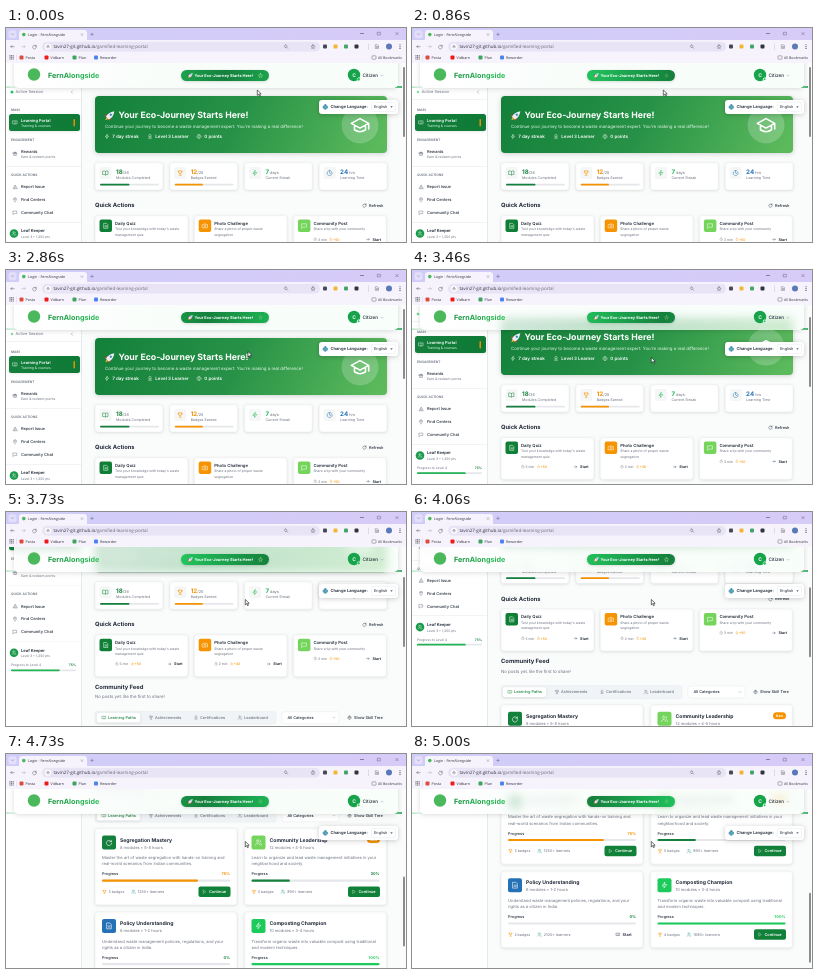
An HTML page with a canvas that plays this animation: 400 by 214 pixels, repeating every 5070 ms.

```html
<!DOCTYPE html>
<html lang="en">
<head>
<meta charset="utf-8">
<title>Learning portal</title>
<style>
html, body { margin: 0; width: 100%; height: 100%; overflow: hidden; background: #fff; }
canvas { display: block; width: 400px; height: 214px; }
</style>
</head>
<body>
<canvas id="stage"></canvas>
<script>
const W = 400, H = 214, TOP = 35, LOOP = 5070, STEP = LOOP / 76;
const canvas = document.getElementById('stage');
const dpr = window.devicePixelRatio || 1;
canvas.width = W * dpr;
canvas.height = H * dpr;
const c = canvas.getContext('2d');

const UI = 'Inter, sans-serif', CHROME = '"Open Sans", sans-serif';
const INK = '#1f2937', GRAY = '#6b7280', GREEN = '#15803d', ORANGE = '#f59300', LIME = '#74d45c';

// Icons on a 24-unit grid
const ICONS = {
  book: 'M12 6v14M2 4h7l3 2 3-2h7v14h-7l-3 2-3-2H2z',
  trophy: 'M7 3h10v7a5 5 0 0 1-10 0zM7 5H3v2l4 4M17 5h4v2l-4 4M12 15v5M8 21h8',
  bolt: 'M13 2L4 14h7l-1 8 10-12h-8z',
  clock: 'M12 2a10 10 0 1 0 .1 0M12 6v6l4 2',
  star: 'M12 2l3 7 7 1-5 5 1 7-6-4-6 4 1-7-5-5 7-1z',
  warn: 'M12 3L2 21h20zM12 10v5M12 17v1',
  pin: 'M12 22S4 15 4 9a8 8 0 0 1 16 0c0 6-8 13-8 13M12 7a2 2 0 1 0 .1 0',
  chat: 'M3 4h18v13H9l-6 4z',
  users: 'M9 3a4 4 0 1 0 .1 0M2 21c0-9 14-9 14 0M17 4a4 4 0 0 1 0 7M19 14q3 2 3 7',
  play: 'M6 3l14 9-14 9z',
  arrow: 'M4 12h16M14 6l6 6-6 6',
  down: 'M5 9l7 7 7-7',
  left: 'M15 5l-7 7 7 7',
  back: 'M20 12H4M10 6l-6 6 6 6',
  cap: 'M12 4L1 10l11 6 11-6zM5 12v6q7 5 14 0v-6M23 10v7',
  gift: 'M3 8h18v4H3zM5 12v9h14v-9M12 8v13M12 8C4 8 7 0 12 8c5-8 8 0 0 0',
  camera: 'M2 7h5l2-3h6l2 3h5v13H2zM12 9a4 4 0 1 0 .1 0',
  reload: 'M20 5v5h-5M20 10a9 9 0 1 0 1 5',
  globe: 'M12 2a10 10 0 1 0 .1 0M2 12h20M12 2q-9 10 0 20q9-10 0-20',
  target: 'M12 2a10 10 0 1 0 .1 0M12 7a5 5 0 1 0 .1 0',
  medal: 'M12 2a6 6 0 1 0 .1 0M8 13l-2 9 6-3 6 3-2-9',
  file: 'M5 2h10l5 5v15H5zM9 12h7M9 16h7',
  search: 'M10 3a7 7 0 1 0 .1 0M15 15l6 6',
  cross: 'M5 5l14 14M19 5L5 19',
  plus: 'M12 4v16M4 12h16',
  square: 'M4 4h16v16H4z'
};
for (const k in ICONS) ICONS[k] = new Path2D(ICONS[k]);

const clamp = v => Math.max(0, Math.min(1, v));
const ease = v => { v = clamp(v); return v * v * (3 - 2 * v); };
const place = (x, y, s = 1) => c.transform(s, 0, 0, s, x, y);

function box(x, y, w, h, r, fill, stroke) {
  c.beginPath();
  c.roundRect(x, y, w, h, r);
  if (fill) { c.fillStyle = fill; c.fill(); }
  if (stroke) { c.strokeStyle = stroke; c.lineWidth = .4; c.stroke(); }
}
function dot(x, y, r, fill) {
  c.beginPath();
  c.arc(x, y, r, 0, 7);
  c.fillStyle = fill;
  c.fill();
}
function text(s, x, y, size, color = INK, weight = 400, align = 'left', font = UI) {
  c.font = `${weight} ${size}px ${font}`;
  c.textAlign = align;
  c.fillStyle = color;
  c.fillText(s, x, y + size * .04);
}
function icon(name, x, y, size, color, lw = 2, fill) {
  c.save();
  place(x - size / 2, y - size / 2, size / 24);
  c.lineWidth = lw;
  c.lineCap = c.lineJoin = 'round';
  c.strokeStyle = color;
  if (fill) { c.fillStyle = fill; c.fill(ICONS[name]); }
  c.stroke(ICONS[name]);
  c.restore();
}
function linear(x0, y0, x1, y1, ...stops) {
  const grad = c.createLinearGradient(x0, y0, x1, y1);
  stops.forEach((s, i) => grad.addColorStop(i / (stops.length - 1), s));
  return grad;
}
function raised(draw, alpha = .1, blur = 3) {
  c.save();
  c.shadowColor = `rgba(0,0,0,${alpha})`;
  c.shadowBlur = blur * dpr;
  c.shadowOffsetY = .8 * dpr;
  draw();
  c.restore();
}
const card = (x, y, w, h) => raised(() => box(x, y, w, h, 3, '#fff', '#e5e7eb'));
function bar(x, y, w, h, part, color) {
  box(x, y, w, h, h / 2, '#e5e7eb');
  if (part) box(x, y, w * part, h, h / 2, color);
}
function rocket(x, y, s) {
  c.save();
  place(x, y, s);
  c.rotate(Math.PI / 4);
  c.fillStyle = '#e23b3b';
  c.beginPath();
  c.moveTo(-2, 0); c.lineTo(-4, 4); c.lineTo(4, 4); c.lineTo(2, 0);
  c.fill();
  c.fillStyle = '#fbbf24';
  c.beginPath();
  c.moveTo(-1.2, 4); c.lineTo(0, 7); c.lineTo(1.2, 4);
  c.fill();
  c.fillStyle = '#e8edf2';
  c.beginPath();
  c.moveTo(0, -6.5);
  c.quadraticCurveTo(4, -1, 2, 4);
  c.lineTo(-2, 4);
  c.quadraticCurveTo(-4, -1, 0, -6.5);
  c.fill();
  dot(0, -1.2, 1.2, '#3b82c4');
  c.restore();
}

function scrollAt(t) {
  const keys = [[3230, 0], [3730, 64.5], [4330, 123], [4960, 249.5]];
  if (t <= keys[0][0]) return 0;
  for (let i = 1; i < keys.length; i++) {
    const [a, from] = keys[i - 1], [b, to] = keys[i];
    if (t <= b) {
      const p = (t - a) / (b - a);
      return from + (to - from) * (p * .5 + ease(p) * .5);
    }
  }
  return 249.5;
}

function sidebar(pulse) {
  box(0, 0, 75, 520, 0, '#fff');
  box(75, 0, .6, 520, 0, '#d9dde2');
  dot(6, 64, 1.2 + pulse * .3, `rgba(34,197,94,${.55 + pulse * .45})`);
  text('Active Session', 9.5, 64, 4, GRAY);
  icon('left', 66, 64, 4.5, GRAY);
  box(0, 71, 75, .4, 0, '#e5e7eb');
  const head = (s, y) => text(s, 5, y, 3.3, GRAY, 600);
  head('MAIN', 82);
  raised(() => box(3, 86, 71, 17, 2.5, linear(3, 0, 74, 0, '#15803d', '#0f7a36')));
  icon('book', 9, 94.5, 5, '#fff');
  text('Learning Portal', 15, 92.3, 4, '#fff', 600);
  text('Training & courses', 15, 98, 3.4, '#dcfce7');
  box(67.5, 91, 1.4, 7.5, .7, ORANGE);
  head('ENGAGEMENT', 112);
  icon('gift', 9, 125.5, 5, GRAY);
  text('Rewards', 15, 123.2, 4, INK, 500);
  text('Earn & redeem points', 15, 129, 3.4, GRAY);
  box(0, 138.5, 75, .4, 0, '#e5e7eb');
  head('QUICK ACTIONS', 147);
  [['warn', 'Report Issue'], ['pin', 'Find Centers'], ['chat', 'Community Chat']].forEach(([i, s], n) => {
    icon(i, 9, 159 + n * 12.8, 4.6, '#4b5563');
    text(s, 15, 159 + n * 12.8, 4, INK, 500);
  });
  box(0, 194, 75, .4, 0, '#e5e7eb');
  dot(8, 205.5, 4.3, '#1a9a4a');
  icon('users', 8, 205.5, 4.5, '#fff');
  text('Leaf Keeper', 15, 203, 4.1, INK, 600);
  text('Level 3 • 1,250 pts', 15, 208.8, 3.3, GRAY);
  text('Progress to Level 4', 5, 218, 3.3, GRAY);
  text('75%', 70, 218, 3.3, GREEN, 600, 'right');
  bar(5, 222.2, 65, 1.8, .75, '#22b455');
}

function hero() {
  raised(() => box(89, 68, 292, 57, 4, linear(89, 68, 340, 190, '#13803a', '#279247', '#5cba5c')), .18, 5);
  rocket(104, 87.5, .95);
  text('Your Eco-Journey Starts Here!', 112.5, 87.3, 8.75, '#fff', 700);
  text("Continue your journey to become a waste management expert. You're making a real difference!", 99, 98.2, 4.4, '#e8f8ec');
  [['bolt', 101, '7 day streak'], ['medal', 144, 'Level 3 Learner'], ['target', 193, '0 points']].forEach(([i, x, s]) => {
    icon(i, x, 108.5, 5, '#fff');
    text(s, x + 5.3, 108.5, 4.5, '#fff', 600);
  });
  dot(354, 97, 18.5, 'rgba(255,255,255,.2)');
  icon('cap', 354, 97, 19, '#fff', 2);
}

function stats() {
  [['book', '18', '/36', 'Modules Completed', '#15803d', .5],
   ['trophy', '12', '/25', 'Badges Earned', ORANGE, .48],
   ['bolt', '7', ' days', 'Current Streak', '#22b455', 0],
   ['clock', '24', ' hrs', 'Learning Time', '#2471b5', 0]].forEach(([i, n, unit, label, color, part], k) => {
    const x = 89 + k * 74.7;
    card(x, 134.5, 68, 27.5);
    box(x + 4.5, 139, 12, 12, 2, '#f4f7f5');
    icon(i, x + 10.5, 145, 6, color);
    text(n, x + 21, 143.6, 6.2, color, 700);
    text(unit, x + 21 + c.measureText(n).width, 144.2, 3.9, GRAY);
    text(label, x + 21, 150, 3.6, GRAY);
    if (part) bar(x + 5, 155.7, 59, 1.8, part, color);
  });
}

function quickActions() {
  text('Quick Actions', 89, 177.2, 5.8, INK, 700);
  icon('reload', 358.5, 177.2, 4.6, INK);
  text('Refresh', 363, 177.2, 3.9, INK, 500);
  [['file', 'Daily Quiz', ["Test your knowledge with today's waste", 'management quiz'], '5 min', '+50', '#0f7f35'],
   ['camera', 'Photo Challenge', ['Share a photo of proper waste', 'segregation'], '2 min', '+30', ORANGE],
   ['chat', 'Community Post', ['Share a tip with your community'], '3 min', '+50', LIME]].forEach(([i, s, lines, time, pts, color], k) => {
    const x = 89 + k * 99.2, y = 206 + lines.length * 5.4;
    card(x, 187.5, 93, 42);
    box(x + 4.5, 191.5, 12.5, 12.5, 2, color);
    icon(i, x + 10.8, 197.8, 6, '#fff');
    text(s, x + 20, 195.2, 4.25, INK, 600);
    lines.forEach((l, n) => text(l, x + 20, 201.2 + n * 5.2, 3.4, GRAY));
    icon('clock', x + 21.8, y, 3.4, GRAY);
    text(time, x + 24.6, y, 3.4, GRAY);
    icon('star', x + 37.5, y, 3.2, ORANGE);
    text(pts, x + 39.5, y, 3.4, ORANGE, 500);
    icon('arrow', x + 74.5, y, 3.8, INK);
    text('Start', x + 79, y, 3.7, INK, 600);
  });
}

function feed() {
  text('Community Feed', 89, 239.6, 5.85, INK, 700);
  text('No posts yet. Be the first to share!', 89, 249.8, 4.35, GRAY);
  box(89, 264, 181, 13, 2.5, '#f1f4f6', '#e3e7ea');
  raised(() => box(91, 265.7, 43, 9.6, 2, '#fff'));
  [['book', 98, 'Learning Paths'], ['trophy', 145, 'Achievements'], ['medal', 190, 'Certifications'], ['users', 234, 'Leaderboard']].forEach(([i, x, s], k) => {
    const color = k ? GRAY : GREEN;
    icon(i, x, 270.4, 4.3, color);
    text(s, x + 4, 270.4, 3.9, color, 500);
  });
  box(276, 264.5, 57, 12, 2.5, '#fff', '#dfe3e6');
  text('All Categories', 281.5, 270.4, 3.9, INK, 500);
  icon('down', 328, 270.4, 3.6, GRAY);
  icon('target', 343.5, 270.4, 4.2, INK);
  text('Show Skill Tree', 348, 270.4, 3.95, INK, 500);
}

function pathCard(k, { name, info, lines, done, tint, color, glyph, badges, learners, tag }) {
  const x = 89 + (k % 2) * 149.5, y = 283.2 + (k >> 1) * 83.5;
  card(x, y, 142, 76.5);
  box(x + 7, y + 7, 14, 14, 2, color);
  icon(glyph, x + 14, y + 14, 7, '#fff');
  text(name, x + 25, y + 11.4, 5.1, INK, 700);
  text(info, x + 25, y + 18.8, 4, GRAY);
  lines.forEach((l, n) => text(l, x + 7, y + 29.4 + n * 6.2, 4.12, GRAY));
  text('Progress', x + 7, y + 45.6, 3.8, INK, 500);
  text(done + '%', x + 135, y + 45.6, 3.9, tint, 700, 'right');
  bar(x + 7, y + 51.2, 128, 2.2, done / 100, tint);
  icon('trophy', x + 9.5, y + 63.4, 4.4, ORANGE);
  text(badges + ' badges', x + 13.4, y + 63.4, 3.6, GRAY);
  icon('users', x + 38.5, y + 63.4, 4.4, '#2a9d8f');
  text(learners + '+ learners', x + 42.8, y + 63.4, 3.75, GRAY);
  if (done) {
    box(x + 103.5, y + 58, 32, 10.5, 2, '#118038');
    icon('play', x + 109.5, y + 63.3, 4, '#fff');
    text('Continue', x + 114, y + 63.3, 3.9, '#fff', 600);
  } else {
    icon('book', x + 117, y + 63.3, 4, INK);
    text('Start', x + 121.5, y + 63.3, 3.9, INK, 600);
  }
  if (tag) {
    box(x + 122.5, y + 7.5, 13, 7, 3.5, ORANGE);
    text(tag, x + 129, y + 11, 3.4, '#fff', 600, 'center');
  }
}
const PATHS = [
  { name: 'Segregation Mastery', info: '8 modules • 5-8 hours', done: 75, tint: ORANGE, color: '#15803d', glyph: 'reload', badges: 3, learners: 1250,
    lines: ['Master the art of waste segregation with hands-on training and', 'real-world scenarios from Indian communities.'] },
  { name: 'Community Leadership', info: '12 modules • 4-5 hours', done: 30, tint: '#15803d', color: LIME, glyph: 'users', badges: 5, learners: 890, tag: 'New',
    lines: ['Learn to organize and lead waste management initiatives in your', 'neighborhood and society.'] },
  { name: 'Policy Understanding', info: '6 modules • 1-2 hours', done: 0, tint: '#15803d', color: '#2471b5', glyph: 'file', badges: 2, learners: 2100,
    lines: ['Understand waste management policies, regulations, and your', 'rights as a citizen in India.'] },
  { name: 'Composting Champion', info: '10 modules • 3-4 hours', done: 100, tint: '#1ccb5b', color: '#1ccb5b', glyph: 'bolt', badges: 4, learners: 1680,
    lines: ['Transform organic waste into valuable compost using traditional', 'and modern techniques.'] }
];

function header(t, pulse) {
  box(383, 58.2, 13, 1.6, 0, linear(383, 0, 396, 0, '#86d9a0', '#16a34a'));
  box(0, 58.6, 12, 1, 0, linear(0, 0, 12, 0, '#86d9a0', '#e6f7ec'));
  raised(() => box(8, TOP - 4, 384, 29, 5, '#fff'), .14, 5);
  // Frosted glass: blurred page under a white veil
  c.save();
  c.beginPath();
  c.roundRect(8, TOP - 4, 384, 29, 5);
  c.clip();
  c.filter = `blur(${4 * dpr}px)`;
  c.drawImage(glass, 0, 0, W, H);
  c.filter = 'none';
  box(8, TOP - 4, 384, 29, 0, linear(8, 0, 392, 0, 'rgba(255,255,255,.86)', 'rgba(247,254,249,.74)', 'rgba(248,255,250,.74)'));
  c.restore();

  dot(28, 46.5, 6.2, '#4cb85c');
  text('FernAlongside', 42, 47.2, 7.2, linear(42, 0, 95, 0, '#15933f', '#2fc25c'), 700);

  const shift = Math.sin(t / 1500 * Math.PI) * 44;
  raised(() => box(175, 42, 88, 11, 5.5, linear(131 + shift, 0, 307 + shift, 0, '#22c55e', '#15803d', '#22c55e')), .15, 3);
  rocket(184.5, 47.3, .5);
  text('Your Eco-Journey Starts Here!', 188.5, 47.5, 3.95, '#fff', 700);
  c.save();
  c.globalAlpha = .55 + pulse * .45;
  icon('star', 254.5, 47.5, 4 + pulse, '#d9f99d', 1.8);
  c.restore();

  dot(348, 47, 6.2, '#16a34a');
  text('C', 348, 47, 5, '#fff', 700, 'center');
  dot(352.6, 51.3, 1.7, '#fff');
  dot(352.6, 51.3, 1 + pulse * .35, '#22c55e');
  text('Citizen', 356.5, 47.4, 4.7, INK, 500);
  icon('down', 376, 47.6, 4, GRAY);
}

function language() {
  raised(() => box(313, 72, 79, 14, 3, '#fff'), .2, 5);
  icon('globe', 319.3, 79, 5.4, '#2471b5', 2.4, '#9be0b4');
  text('Change Language:', 324.5, 79, 4.1, INK, 600);
  box(365.5, 74.3, 24, 9.4, 1.5, '#fff', '#dde1e5');
  text('English', 368, 79, 3.9, INK);
  icon('down', 385.5, 79, 3.2, INK, 2, INK);
}

function browser() {
  const label = (s, x, y, size, color = '#33323c') => text(s, x, y, size, color, 400, 'left', CHROME);
  box(0, 0, W, 13, 0, linear(0, 0, W, 0, '#cfcdf8', '#d7cbf8'));
  box(0, 12, W, 23, 0, '#f6f3fd');
  box(2.5, 2.2, 8, 8, 2, '#e3defb');
  icon('down', 6.5, 6.2, 3.6, '#33323c');
  box(13, 2, 68, 12, [3, 3, 0, 0], '#f6f3fd');
  dot(17.8, 6.6, 1.8, '#4cb85c');
  label('Login - FernAlongside', 22, 6.6, 3.7);
  icon('cross', 76, 6.6, 3, '#33323c');
  icon('plus', 86, 6.4, 3.8, '#33323c');
  box(354, 5.4, 4, .5, 0, '#33323c');
  icon('square', 373, 5.6, 4, '#33323c');
  icon('cross', 391, 5.6, 4, '#33323c');

  icon('back', 6.5, 18.6, 5, '#44434c');
  icon('arrow', 17.5, 18.6, 5, '#a9a6b4');
  icon('reload', 28.5, 18.6, 5, '#44434c');
  box(36, 13.8, 278, 9.8, 4.9, '#e8e4f6');
  dot(42, 18.7, 3, '#fff');
  icon('target', 42, 18.7, 3.4, '#44434c');
  const host = 'tavin27-git.github.io';
  label(host, 47.5, 18.6, 4.5);
  const w = c.measureText(host).width;
  label('/gamified-learning-portal', 47.5 + w, 18.6, 4.5, '#6a6875');
  icon('search', 280, 18.6, 4.6, '#44434c');
  icon('star', 307, 18.6, 4.8, '#44434c');
  ['#454a57', '#f2b632', '#45a36b', '#33333b'].forEach((k, i) => box(317 + i * 10.5, 16.6, 4, 4, 1, k));
  box(362.5, 15.5, .5, 6.5, 0, '#c6bfe4');
  icon('file', 371, 18.6, 4.4, '#44434c');
  dot(383, 18.6, 3, '#5a79b8');
  for (let i = -1; i < 2; i++) dot(394, 18.6 + i * 1.8, .55, '#44434c');

  for (let i = 0; i < 9; i++) box(3.5 + i % 3 * 1.6, 27.2 + (i / 3 | 0) * 1.6, 1, 1, 0, '#55535f');
  box(10, 26.5, .4, 6, 0, '#cfc9e6');
  [['Posta', 15.5, '#dc4b3e'], ['Vidbarn', 40.5, '#f01818'], ['Plan', 68.5, '#3ba55c'], ['Reworder', 90, '#4b83ee']].forEach(([s, x, k]) => {
    box(x - 2, 27.5, 4, 4, 1, k);
    label(s, x + 4, 29.5, 3.7);
  });
  box(366, 27.8, 4, 3.4, .6, null, '#44434c');
  label('All Bookmarks', 372, 29.5, 3.6);
}

function cursor(t) {
  const a = ease((t - 2550) / 300), b = ease((t - 2950) / 300);
  const x = 251.3 - a * 10 - b * 2, y = 62 + a * 21 + b * 4.5;
  c.beginPath();
  [[0, 0], [0, 5.4], [1.3, 4.2], [2.2, 6.2], [3.1, 5.8], [2.2, 3.9], [3.9, 3.8]].forEach(([dx, dy]) => c.lineTo(x + dx, y + dy));
  c.closePath();
  c.fillStyle = '#fff';
  c.strokeStyle = '#111';
  c.lineWidth = .6;
  c.fill();
  c.stroke();
}

const glass = document.createElement('canvas');
glass.width = canvas.width;
glass.height = canvas.height;
const g = glass.getContext('2d');

function draw(t) {
  const scroll = scrollAt(t), pulse = .5 + .5 * Math.cos(t / 1000 * Math.PI);
  c.setTransform(dpr, 0, 0, dpr, 0, 0);
  c.textBaseline = 'middle';
  c.textRendering = 'geometricPrecision';
  box(0, 0, W, H, 0, '#fafbfb');
  c.save();
  place(0, -scroll);
  sidebar(pulse);
  hero();
  stats();
  quickActions();
  feed();
  PATHS.forEach((p, k) => pathCard(k, p));
  c.restore();
  g.drawImage(canvas, 0, 0);
  header(t, pulse);
  language();
  box(396, TOP, 4, H - TOP, 0, '#fbfbfb');
  box(397, 39 + scroll * .4, 2, 70, 1, '#8d8d8d');
  browser();
  cursor(t);
}

const start = performance.now();
function frame() {
  const t = (performance.now() - start) % LOOP;
  draw(Math.floor((t + 7) / STEP) * STEP % LOOP);
  requestAnimationFrame(frame);
}
frame();
</script>
</body>
</html>
```
